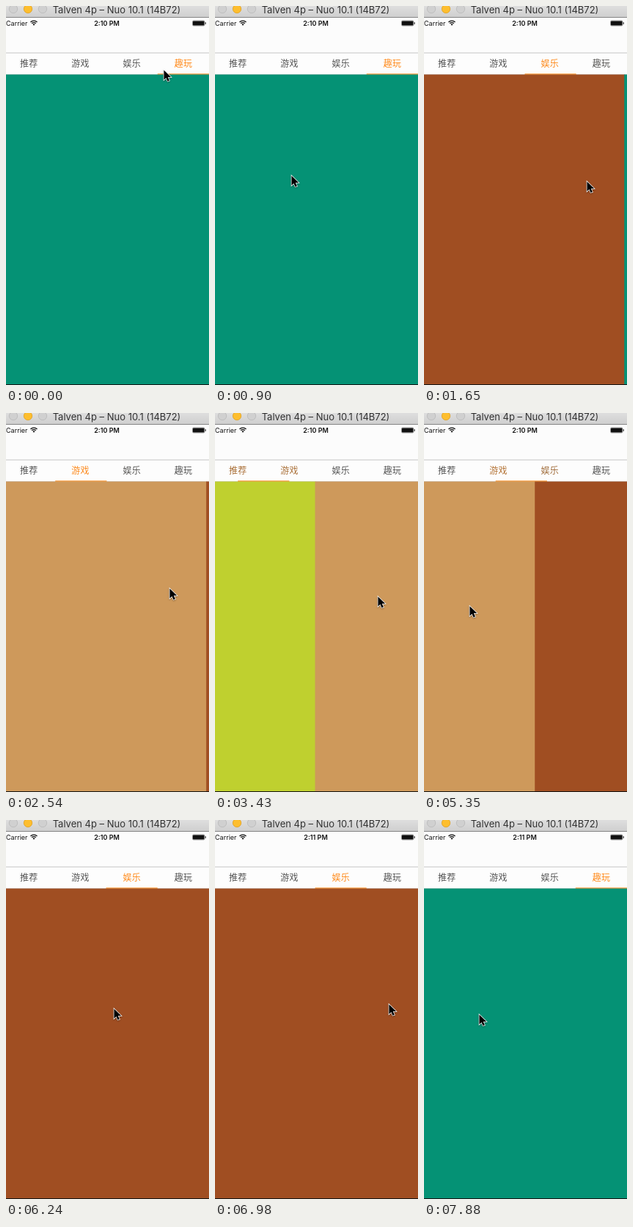
Animation, 277 px wide and 517 px high, one loop 8 s. Source, as an HTML page with a canvas:

```html
<!DOCTYPE html>
<html lang="zh">
<head>
<meta charset="utf-8">
<style>
  html, body { margin: 0; width: 277px; height: 517px; overflow: hidden; }
  canvas { display: block; }
</style>
</head>
<body>
<canvas id="stage" width="277" height="517"></canvas>
<script>
const ctx = document.getElementById('stage').getContext('2d');
const LOOP = 8000, STEP = 148.5;
const LEFT = -4, SCREEN = 281, TAB = SCREEN / 4;
const tabs = ['推荐', '游戏', '娱乐', '趣玩'];
const pages = ['#bfd02f', '#ce995b', '#a04e22', '#059275'];
const GRAY = [85, 85, 85], ORANGE = [255, 138, 26];

// Each swipe drags the pointer from grip to drop, then the page settles.
// Times are in steps; the first and last rows only place the pointer.
const swipes = [
  { start: -1, time: 1, page: 3, grip: 215, drop: 215, y: 87 },
  { start: 8, time: 3.22, page: 2, grip: 97, drop: 222, y: 239 },
  { start: 14, time: 3.22, page: 1, grip: 97, drop: 223, y: 239 },
  { start: 21, time: 4, page: 0, grip: 50, drop: 222, y: 250 },
  { start: 26.14, time: 4, page: 1, grip: 194, drop: 69, y: 256 },
  { start: 34.14, time: 4, page: 2, grip: 188, drop: 62, y: 263 },
  { start: 47, time: 2, page: 3, grip: 237, drop: 9, y: 251 },
  { start: 54, time: 1, page: 3, grip: 75, drop: 75, y: 265 }
];

const mix = (a, b, f) => a + (b - a) * f;
function ease(u) {
  u = Math.min(1, Math.max(0, u));
  return u * u * (3 - 2 * u);
}

function pose(n) {
  const i = swipes.findLastIndex(s => s.start <= n);
  const now = swipes[i], next = swipes[i + 1];
  const moved = ease((n - now.start) / now.time);
  const end = now.start + now.time;
  const back = ease((n - end) / (next.start - 1 - end));
  return {
    pos: mix(swipes[Math.max(0, i - 1)].page, now.page, moved),
    x: mix(mix(now.grip, now.drop, Math.min(1, moved / .447)), next.grip, back),
    y: mix(now.y, next.y, back)
  };
}

function rect(x, y, w, h, color) {
  ctx.fillStyle = color;
  ctx.fillRect(x, y, w, h);
}

function label(text, x, y, font, color, align = 'center') {
  ctx.font = font;
  ctx.fillStyle = color;
  ctx.textAlign = align;
  ctx.fillText(text, x, y);
}

function titleBar() {
  const shade = ctx.createLinearGradient(0, 0, 0, 15);
  shade.addColorStop(0, '#dedede');
  shade.addColorStop(1, '#cfcfcf');
  rect(0, 0, 277, 15, shade);
  rect(0, 15, 277, 1, '#858585');
  ['#d0d0d0', '#fdbe2e', '#d0d0d0'].forEach((color, i) => {
    ctx.beginPath();
    ctx.arc(10 + 20 * i, 4, 5.7, 0, 7);
    ctx.fillStyle = color;
    ctx.fill();
    ctx.lineWidth = .8;
    ctx.strokeStyle = i === 1 ? '#dfa023' : '#b8b8b8';
    ctx.stroke();
  });
  label('Talven 4p – Nuo 10.1 (14B72)', 151, 10, '13px Inter, sans-serif', '#333');
}

function statusBar(time) {
  rect(0, 16, 277, 47, '#fcfcfc');
  label('Carrier', 0, 27, '9px Inter, sans-serif', '#111', 'left');
  label(time, 137.5, 27, '600 9px Inter, sans-serif', '#111');
  ctx.strokeStyle = ctx.fillStyle = '#111';
  ctx.lineWidth = 1.3;
  for (const r of [4, 6.4]) {
    ctx.beginPath();
    ctx.arc(38, 26.6, r, -Math.PI * .75, -Math.PI * .25);
    ctx.stroke();
  }
  ctx.beginPath();
  ctx.moveTo(38, 26.8);
  ctx.arc(38, 26.6, 2.2, -Math.PI * .75, -Math.PI * .25);
  ctx.fill();
  ctx.lineWidth = .4;
  ctx.beginPath();
  ctx.roundRect(254.5, 20, 16.5, 7, 1.5);
  ctx.stroke();
  ctx.beginPath();
  ctx.roundRect(255, 20.5, 15.5, 6, 1);
  ctx.fill();
  rect(271.7, 22.2, 1, 2.6, '#111');
}

function tabBar(pos) {
  rect(0, 63, 277, 2, '#e0e0e0');
  rect(0, 65, 277, 28, '#fdfdfd');
  rect(0, 93, 277, 1, '#c9c9c9');
  tabs.forEach((name, i) => {
    const f = Math.max(0, 1 - Math.abs(pos - i));
    const rgb = GRAY.map((v, j) => Math.round(mix(v, ORANGE[j], f)));
    label(name, LEFT + TAB * (i + .5), 83, '12px "Noto Sans CJK SC", "Noto Sans CJK", sans-serif', `rgb(${rgb})`);
  });
  rect(LEFT + TAB * pos, 92.25, TAB, 1.5, '#f8922c');
}

function arrow(x, y) {
  ctx.save();
  ctx.translate(x, y);
  ctx.scale(.92, .92);
  ctx.beginPath();
  [[.5, .5], [.5, 15], [3.8, 12], [6, 17], [8.6, 16], [6.4, 11], [11, 11]]
    .forEach(p => ctx.lineTo(...p));
  ctx.closePath();
  ctx.shadowColor = 'rgba(0,0,0,.35)';
  ctx.shadowBlur = 2;
  ctx.shadowOffsetY = 1;
  ctx.lineWidth = 1.6;
  ctx.strokeStyle = '#fff';
  ctx.stroke();
  ctx.shadowColor = 'transparent';
  ctx.fillStyle = '#000';
  ctx.fill();
  ctx.restore();
}

function draw(now) {
  const t = now % LOOP;
  const n = Math.floor((t + 10) / STEP); // the screen refreshes in even steps
  const { pos, x, y } = pose(n);
  titleBar();
  statusBar(n < 45 ? '2:10 PM' : '2:11 PM');
  tabBar(pos);
  // the later page covers the earlier one, overlapping half a pixel of the bar
  pages.forEach((color, i) => {
    if (Math.abs(i - pos) < 1) rect(LEFT + SCREEN * (i - pos), 93.5, SCREEN + 1, 422.5, color);
  });
  rect(0, 516, 277, 1, '#151515');
  arrow(Math.round(x), Math.round(y));
  requestAnimationFrame(draw);
}
requestAnimationFrame(draw);
</script>
</body>
</html>
```
